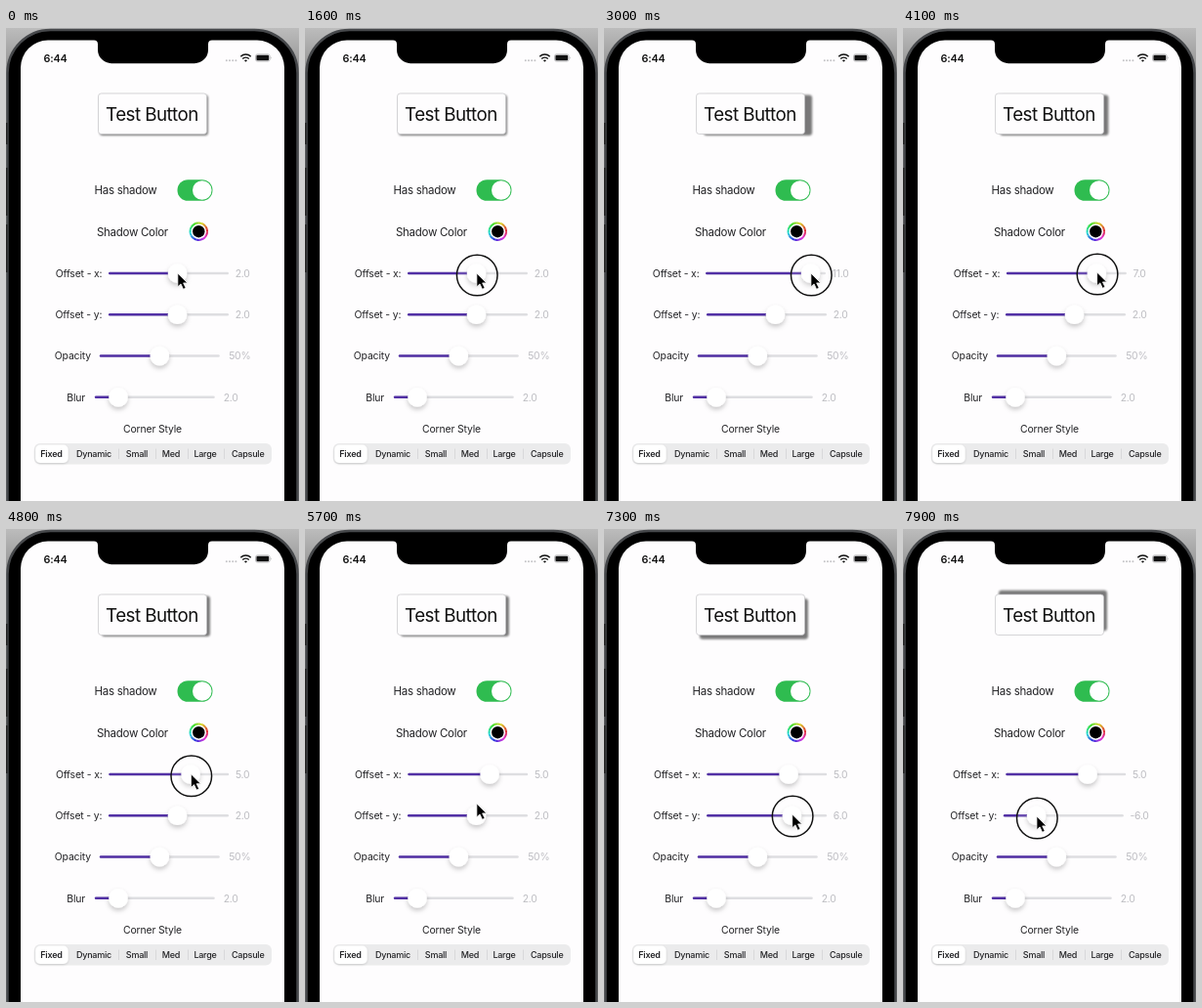
An HTML page for the animation above (8 s loop, 300x484 px).

```html
<!DOCTYPE html>
<html lang="en">
<head>
<meta charset="utf-8">
<title>Button shadow settings</title>
<style>
  html, body { margin: 0; width: 100%; height: 100%; overflow: hidden; }
  body { background: linear-gradient(#bcbcbc, #8c8c8c 50px); }
  svg { display: block; width: 300px; height: 484px; }
  text { font: 10.4px Inter, Roboto, sans-serif; letter-spacing: -.014em; fill: #232326; }
  .body { font-size: 11.5px; letter-spacing: -.025em; }
  .title { font-size: 18.8px; letter-spacing: -.03em; fill: #111; }
  .clock { font-size: 10.8px; font-weight: 600; fill: #111; }
  .value { fill: #bdbdc2; letter-spacing: -.025em; }
  .seg text { font-size: 9px; font-weight: 500; letter-spacing: -.025em; text-anchor: middle; }
  .seg .on { font-weight: 600; }
  .mid { text-anchor: middle; }
</style>
</head>
<body>
<svg id="stage" viewBox="0 0 300 484">
  <defs>
    <filter id="blur" x="-20%" y="-40%" width="140%" height="180%"><feGaussianBlur stdDeviation=".8"/></filter>
    <filter id="lift" x="-100%" y="-100%" width="300%" height="300%">
      <feDropShadow dx="0" dy="2.8" stdDeviation="2.6" flood-opacity=".22"/>
    </filter>
    <filter id="raise" x="-20%" y="-40%" width="140%" height="180%">
      <feDropShadow dx="0" dy="1" stdDeviation="1.2" flood-opacity=".15"/>
    </filter>
  </defs>

  <!-- phone -->
  <rect x="1.5" y="2" width="297" height="560" rx="44" stroke="#46484b" stroke-width="2.5"/>
  <path d="M0 97h1.5v22H0zM0 143h1.5v49H0zM0 201h1.5v49H0z" fill="#222"/>
  <path fill="#fefdfe" d="M15 484V40.6a28 28 0 0 1 28-28H90q4 0 4 4v5.6a14 14 0 0 0 14 14h85a14 14 0 0 0 14-14v-5.6q0-4 4-4h46a28 28 0 0 1 28 28V484z"/>

  <!-- status bar -->
  <text class="clock" x="38.4" y="34.5">6:44</text>
  <g fill="#c3c3c6">
    <circle cx="225.8" cy="33.2" r="1"/><circle cx="229" cy="33.2" r="1"/>
    <circle cx="232.2" cy="33.2" r="1"/><circle cx="235.4" cy="33.2" r="1"/>
  </g>
  <g fill="none" stroke="#111" stroke-width="1.5">
    <path d="M240.3 29.2a7.4 7.4 0 0 1 10.4 0M242.2 31.5a4.7 4.7 0 0 1 6.6 0"/>
    <path d="M243.9 33l1.6 1.7 1.6-1.7q-1.6-1.2-3.2 0z" fill="#111" stroke="none"/>
  </g>
  <rect x="255.5" y="26.9" width="14.6" height="7.2" rx="2" fill="none" stroke="#a4a4a6" stroke-width=".7"/>
  <rect x="256.4" y="27.8" width="12.8" height="5.4" rx="1.2" fill="#111"/>
  <path d="M271 29.3q1.2 1.2 0 2.4z" fill="#a4a4a6"/>

  <!-- button -->
  <rect id="shadow" x="94.5" y="67" width="111" height="41.5" rx="3" opacity=".52" filter="url(#blur)"/>
  <rect x="94.5" y="67" width="111" height="41.5" rx="3" fill="#fefdfe" stroke="#c4c4c8" stroke-width=".7"/>
  <text class="title mid" x="149.4" y="94.8">Test Button</text>

  <!-- toggle and colour well -->
  <text class="body" x="90.6" y="170.3">Has shadow</text>
  <rect x="175.5" y="155.2" width="36" height="21.6" rx="10.8" fill="#2fbc50"/>
  <circle cx="200.8" cy="166" r="9.8" fill="#fff"/>
  <text class="body" x="93" y="212.5">Shadow Color</text>
  <g id="wheel" fill="none" stroke-width="2"></g>
  <circle cx="197.3" cy="208.2" r="6.2"/>

  <g id="rows"></g>

  <!-- segmented control -->
  <text class="mid" x="150" y="413.8">Corner Style</text>
  <g class="seg">
    <rect x="28.8" y="425" width="243.2" height="21.6" rx="6" fill="#ebebec"/>
    <rect x="30.2" y="426.6" width="33.4" height="18.4" rx="4.8" fill="#fff" filter="url(#raise)"/>
    <path d="M115.5 430.5v10.5M153.5 430.5v10.5M186.5 430.5v10.5M223.5 430.5v10.5" stroke="#d3d3d6" stroke-width=".8"/>
    <text class="on" x="46.5" y="439">Fixed</text>
    <text x="90" y="439">Dynamic</text>
    <text x="134" y="439">Small</text>
    <text x="169" y="439">Med</text>
    <text x="204" y="439">Large</text>
    <text x="247.7" y="439">Capsule</text>
  </g>

  <circle id="ring" cx=".4" cy="2" r="20.8" fill="#fff" fill-opacity=".15" stroke="#111" stroke-width="1.5"/>
  <path id="cursor" d="M0 0V13.8L3.2 10.9 5.7 16.3 8.3 15.1 5.8 9.9H10z" stroke="#fff" stroke-width=".8" stroke-linejoin="round"/>
</svg>
<script>
const $ = id => document.getElementById(id);
const LOOP = 8000, STEP = 100, SCALE = 0.69, TRACK = 123;

function add(parent, tag, attrs, text = '') {
  const el = document.createElementNS('http://www.w3.org/2000/svg', tag);
  for (const k in attrs) el.setAttribute(k, attrs[k]);
  el.textContent = text;
  return parent.appendChild(el);
}

// Linear interpolation through [time, value] pairs
function at(keys, t) {
  const i = keys.findIndex(k => k[0] > t);
  if (i < 0) return keys[keys.length - 1][1];
  if (i === 0) return keys[0][1];
  const [t0, a] = keys[i - 1], [t1, b] = keys[i];
  return a + (b - a) * (t - t0) / (t1 - t0);
}

function slider(label, y, labelX, trackX, thumb, valueX, value) {
  const g = add($('rows'), 'g', {});
  add(g, 'text', { x: labelX, y: y + 3.8 }, label);
  add(g, 'rect', { x: trackX, y: y - 1.3, width: TRACK, height: 2.6, rx: 1.3, fill: '#dedee1' });
  const fill = add(g, 'rect', { x: trackX, y: y - 1.3, width: thumb, height: 2.6, rx: 1.3, fill: '#5230a5' });
  const text = add(g, 'text', { x: valueX, y: y + 3.8, class: 'value' }, value);
  const knob = add(g, 'circle', { cx: trackX + thumb, cy: y, r: 9.8, fill: '#fff', filter: 'url(#lift)' });
  const baseWidth = text.getComputedTextLength();
  // Moves the thumb, keeps the row centred and returns the thumb's x
  return v => {
    const pos = TRACK / 2 + v * 4.3;
    text.textContent = Math.round(v) + '.0';
    const shift = (baseWidth - text.getComputedTextLength()) / 2;
    g.setAttribute('transform', `translate(${shift} 0)`);
    fill.setAttribute('width', pos);
    knob.setAttribute('cx', trackX + pos);
    return trackX + pos + shift;
  };
}

for (let a = 0; a < 360; a += 10) {
  const p = d => {
    const r = d * Math.PI / 180;
    return `${197.3 + 8.7 * Math.cos(r)} ${208.2 + 8.7 * Math.sin(r)}`;
  };
  add($('wheel'), 'path', { d: `M${p(a)}A8.7 8.7 0 0 1 ${p(a + 11)}`, stroke: `hsl(${345 - a} 72% 51%)` });
}

const setX = slider('Offset - x:', 251, 50.8, 105, 70.6, 234.7, '2.0');
const setY = slider('Offset - y:', 293.3, 50.5, 105, 70.6, 234.7, '2.0');
slider('Opacity', 335.5, 49.8, 95.8, 61.5, 228.2, '50%');
slider('Blur', 377.8, 62.3, 90.8, 24.2, 222.8, '2.0');

const xKeys = [[1650, 2.1], [1900, 3.2], [2700, 10.2], [3000, 10.7], [3500, 10.9], [3800, 9.8], [4100, 7.2], [4400, 6], [4700, 5.2]];
const yKeys = [[6000, 2.1], [6300, 5], [6700, 10.35], [7000, 10.4], [7200, 8.5], [7600, -1.5], [7900, -6.45]];
const tipKeys = [[0, 251], [3000, 251], [4100, 250], [5000, 251], [5600, 281], [5750, 281], [5950, 289], [6700, 290], [7900, 294]];
const hopKeys = [[5000, 0], [5600, 1]];

function draw(t) {
  const vx = at(xKeys, t), vy = at(yKeys, t);
  const thumbX = setX(vx), thumbY = setY(vy);
  $('shadow').setAttribute('transform', `translate(${Math.round(vx) * SCALE} ${Math.round(vy) * SCALE})`);
  const tip = `translate(${thumbX + (thumbY - thumbX) * at(hopKeys, t) + 0.3} ${at(tipKeys, t)})`;
  const pressed = t >= 1200 && t < 4900 || t >= 5900;
  $('ring').setAttribute('transform', tip);
  $('ring').setAttribute('visibility', pressed ? 'visible' : 'hidden');
  $('cursor').setAttribute('transform', tip);
}

const start = performance.now();
function tick() {
  const t = (performance.now() - start) % LOOP;
  draw(Math.floor(t / STEP) * STEP);
  requestAnimationFrame(tick);
}
tick();
</script>
</body>
</html>
```
